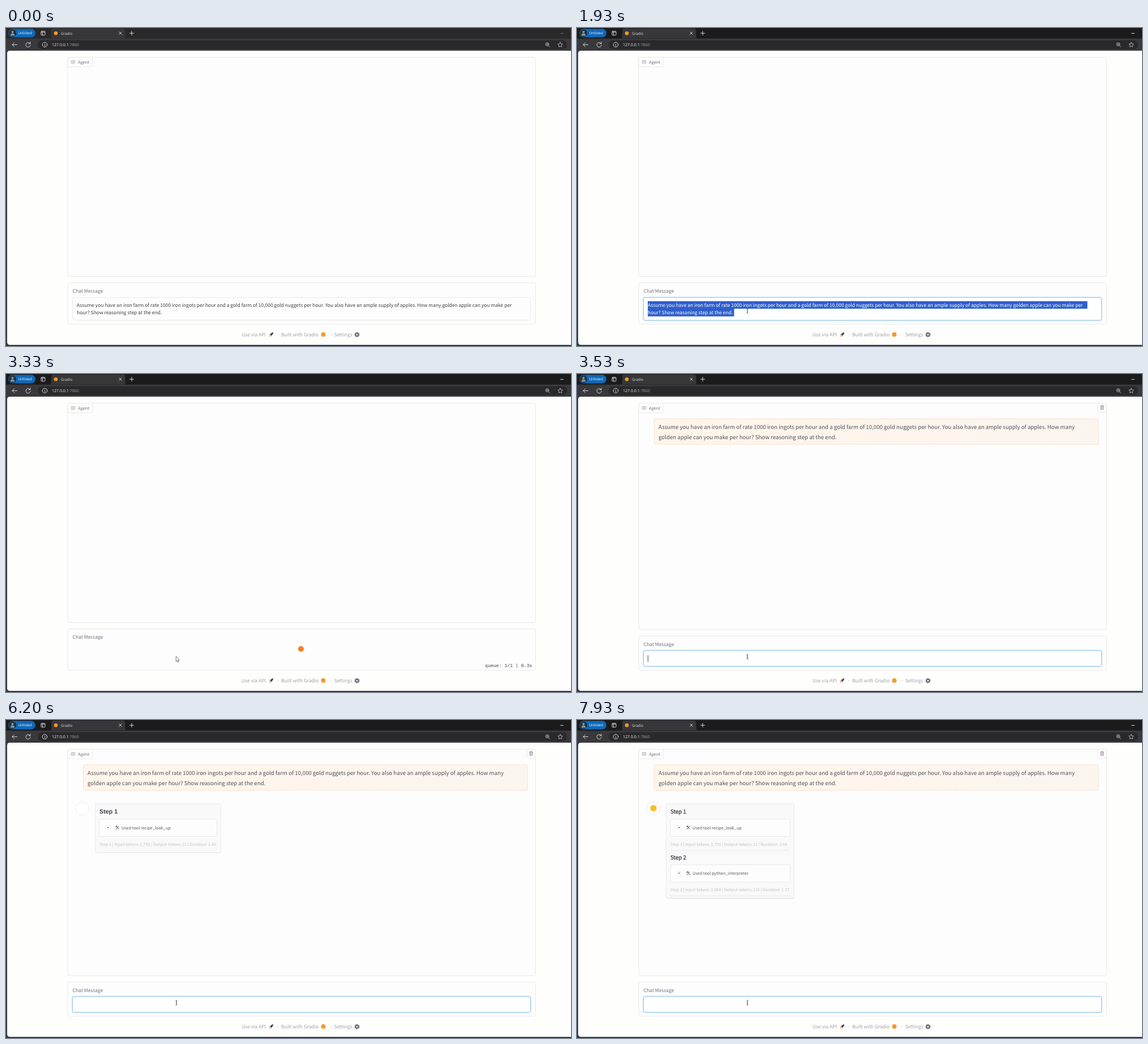
An HTML page that plays this animation: 998x561 px, repeating every 8 s.

```html
<!DOCTYPE html>
<html lang="en">
<head>
<meta charset="utf-8">
<title>Agent chat</title>
<style>
html, body { margin: 0; width: 100%; height: 100%; overflow: hidden; background: #37373a; }
svg { display: block; width: 100vw; height: 100vh; }
text {
  font-family: "Noto Sans CJK JP", "Noto Sans CJK SC", "Noto Sans CJK KR", "Open Sans", sans-serif;
  text-rendering: geometricPrecision;
  white-space: pre;
}
.ui { font-family: "Open Sans", "Noto Sans", sans-serif; }
.mono { font: 8.15px "Liberation Mono", monospace; fill: #3f3f46; }
.md { font-size: 8.47px; }
.sm { font-size: 7.28px; }
.lg { font-size: 9.68px; }
.label { fill: #71717a; }
.ink { fill: #3f3f46; }
.meta { fill: #c3c3c8; }
.foot { fill: #a1a1aa; }
.head { fill: #33333a; stroke: #33333a; stroke-width: .25; }
.plain { font: bold 10.7px "Liberation Sans", sans-serif; fill: #3f3f46; }
.box { fill: #fdfdfd; stroke: #e5e5e8; stroke-width: .8; }
.line { fill: none; stroke: #d8d8da; stroke-width: 1; stroke-linecap: round; stroke-linejoin: round; }
.focus { fill: #fff; stroke: #93c7ee; stroke-width: 1; }
.glow { fill: none; stroke: #d9ecfb; stroke-width: 2.4; }
.caret { fill: #3a3a40; }

/* every part shares one 8 s clock */
.t { animation: 8s step-end infinite; }
.active { animation-name: active; }
.pick { animation-name: pick; }
.compose { animation-name: compose; }
.before { animation-name: before; }
.queue { animation-name: queue; }
.chat { animation-name: chat; }
.click { animation-name: click; }
.blink { animation-name: blink; }
.reply { animation-name: reply; }
.raw { animation-name: raw; }
.styled { animation-name: styled; }
.face { animation-name: face; }
.one { animation-name: one; }
.two { animation-name: two; }
.beam { animation-name: beam; }
.hover { animation: hover 8s ease-in-out infinite; }
.digits { animation: digits 8s linear infinite; }

@keyframes active { 0% { opacity: 0 } 11.5%, to { opacity: 1 } }
@keyframes click { 0% { opacity: 0 } 11.5% { opacity: 1 } 18.2%, to { opacity: 0 } }
@keyframes pick { 0% { opacity: 0 } 21.5% { opacity: 1 } 37.4%, to { opacity: 0 } }
@keyframes compose { 0% { opacity: 1 } 37.4%, to { opacity: 0 } }
@keyframes before { 0% { opacity: 1 } 43.9%, to { opacity: 0 } }
@keyframes queue { 0% { opacity: 0 } 37.4% { opacity: 1 } 43.9%, to { opacity: 0 } }
@keyframes chat { 0% { opacity: 0 } 43.9%, to { opacity: 1 } }
@keyframes blink {
  0%, 45.8%, 59%, 71.5%, 84.9%, 98.2%, to { opacity: 0 }
  43.9%, 52.4%, 64.9%, 78.25%, 91.5% { opacity: 1 }
}
@keyframes reply { 0% { opacity: 0 } 77.25%, to { opacity: 1 } }
@keyframes raw { 0% { opacity: 0 } 77.25% { opacity: 1 } 78.25%, to { opacity: 0 } }
@keyframes styled { 0% { opacity: 0 } 78.25%, to { opacity: 1 } }
@keyframes face { 0% { opacity: 0 } 82.4%, to { opacity: 1 } }
@keyframes one { 0% { opacity: 0 } 77.25% { opacity: 1 } 98.2%, to { opacity: 0 } }
@keyframes two { 0% { opacity: 0 } 98.2%, to { opacity: 1 } }
@keyframes beam { 0% { opacity: 0 } 10% { opacity: 1 } 37.4% { opacity: 0 } 43.9%, to { opacity: 1 } }
@keyframes hover {
  0%, 16.2% { transform: translate(224px, 488px) }
  21.3%, to { transform: translate(301px, 498.7px) }
}
@keyframes digits {
  0%, 37.4% { transform: none; animation-timing-function: steps(6) }
  44.9%, to { transform: translateY(-72px) }
}
</style>
</head>
<body>
<svg viewBox="0 0 998 561" preserveAspectRatio="none">
  <defs>
    <linearGradient id="peach" x2="1">
      <stop offset="0" stop-color="#fff5ea"/>
      <stop offset="1" stop-color="#fbf5f0"/>
    </linearGradient>
    <clipPath id="slot"><rect x="918" y="509" width="8" height="10"/></clipPath>
    <g id="ask" class="md">
      <text x="125" y="491.5">Assume you have an iron farm of rate 1000 iron ingots per hour and a gold farm of 10,000 gold nuggets per hour. You also have an ample supply of apples. How many golden apple can you make per</text>
      <text x="125" y="505.2">hour? Show reasoning step at the end.</text>
    </g>
    <g id="tools" fill="none" stroke-linecap="round">
      <path d="M-2.6 2.6 2 -2" stroke="#77777f" stroke-width="1.1"/>
      <path d="M2.6 2.6 -1.4 -1.4" stroke="#a8705a" stroke-width="1.1"/>
      <path d="M-3 -1.2 -1.2 -3" stroke="#55555c" stroke-width="1.4"/>
    </g>
    <g id="fold">
      <circle r="4" fill="#f7f7f8" stroke="#ededf0" stroke-width=".6"/>
      <path d="M-1.7 -.7h3.4L0 1.2z" fill="#66666e"/>
    </g>
  </defs>

  <!-- browser chrome -->
  <rect width="998" height="561" fill="#38383d"/>
  <rect width="998" height="18.5" fill="#292929"/>
  <rect class="t active" width="998" height="18.5" fill="#1b1b1c"/>
  <path d="M77 18.5q3 0 3-3V4.500q0-3.500 3.500-3.500H207q3.500 0 3.500 3.500V15.500q0 3 3 3z" fill="#37373a"/>
  <rect x="4" y="1.500" width="48" height="15" rx="7.500" fill="#0f69b9"/>
  <circle cx="11.500" cy="9" r="6.600" fill="#23303c"/>
  <circle cx="11.500" cy="7" r="2.100" fill="#8b98a3"/>
  <path d="M7.700 13.600q0-4 3.800-4t3.800 4z" fill="#8b98a3"/>
  <text class="ui" x="21.500" y="11.300" font-size="6.300" fill="#fff">Unlisted</text>
  <rect class="line" x="62" y="5.800" width="7" height="7" rx="1.300"/>
  <path class="line" d="M62.500 7.200h6M64.300 8v4.500" stroke-width="1.500"/>
  <circle cx="88" cy="9.200" r="3.300" fill="#f59a2c"/>
  <text class="ui" x="97" y="11.600" font-size="6.400" fill="#e8e8e8">Gradio</text>
  <path class="line" d="M199.800 7l4.300 4.300m0-4.300-4.300 4.300M218.500 9.200h7M222 5.700v7"/>
  <path class="line" d="M979.500 9.500h5" opacity=".4"/>
  <path class="line t active" d="M979.500 9.500h5"/>
  <path class="line" d="M19.500 29.500h-8.500m3.700-3.700L11 29.500l3.700 3.700"/>
  <path class="line" d="M42.600 27.500a4.100 4.100 0 1 0 .6 2.700M43 24.800v2.900h-2.900"/>
  <rect x="55" y="21" width="937" height="17" rx="8.500" fill="#29292c" stroke="#47474b" stroke-width=".7"/>
  <circle class="line" cx="68.500" cy="29.400" r="4.200"/>
  <path class="line" d="M68.500 29.200v2.200M68.500 27.300v.1"/>
  <text class="ui" x="81" y="32" font-size="7.050" fill="#f4f4f4">127.0.0.1<tspan fill="#a0a0a4">:7860</tspan></text>
  <g opacity=".75">
    <circle class="line" cx="956" cy="28.700" r="2.900"/>
    <path class="line" d="M958.200 31l2.300 2.300M954.700 28.700h2.600M956 27.400v2.600" stroke-width=".8"/>
    <path class="line" d="M979 25.200l1.300 2.700 3 .4-2.200 2.100.5 3-2.600-1.400-2.600 1.400.5-3-2.200-2.100 3-.4z" stroke-width=".8"/>
  </g>
  <path d="M998 40H7q-5 0-5 5V554q0 5 5 5H998z" fill="#fefefd"/>

  <!-- panels before the message is sent -->
  <g class="t before">
    <rect class="box" x="109" y="51.500" width="826.500" height="387" rx="3"/>
    <rect class="box" x="109" y="449.500" width="826.500" height="73" rx="3"/>
    <text class="md label" x="117.500" y="466.500">Chat Message</text>
  </g>
  <g class="t compose">
    <rect class="box" x="117.500" y="475.500" width="809" height="40" rx="3"/>
    <g class="t active">
      <rect class="glow" x="117" y="475" width="810" height="41" rx="3.500"/>
      <rect class="focus" x="117.500" y="475.500" width="809" height="40" rx="3"/>
    </g>
    <use href="#ask" class="ink"/>
  </g>
  <rect class="caret t click" x="223.500" y="482" width=".9" height="12.500"/>
  <g class="t pick">
    <path d="M125 482H901.500V495.300H277.500V508.700H125z" fill="#2e5fcb"/>
    <use href="#ask" fill="#fff"/>
  </g>

  <!-- waiting -->
  <g class="t queue">
    <circle cx="521" cy="485" r="5" fill="#f0802b"/>
    <text class="mono" x="846.300" y="516.600">queue: 1/1 | 0.</text>
    <g clip-path="url(#slot)">
      <text class="mono digits"><tspan x="919.700" y="516.600">0</tspan><tspan x="919.700" dy="12">1</tspan><tspan x="919.700" dy="12">2</tspan><tspan x="919.700" dy="12">3</tspan><tspan x="919.700" dy="12">4</tspan><tspan x="919.700" dy="12">5</tspan></text>
    </g>
    <text class="mono" x="924.600" y="516.600">s</text>
    <path d="M300.300 498v9.200l2.100-1.900 1.400 3 1.300-.6-1.400-2.900h2.800z" fill="#fff" stroke="#44444a" stroke-width=".7"/>
  </g>

  <!-- conversation -->
  <g class="t chat">
    <rect class="box" x="109" y="51.500" width="826.500" height="399.500" rx="3"/>
    <rect class="box" x="109" y="462" width="826.500" height="60.500" rx="3"/>
    <text class="md label" x="117.500" y="479.500">Chat Message</text>
    <rect class="glow" x="117" y="487.500" width="810" height="28.500" rx="3.500"/>
    <rect class="focus" x="117.500" y="488" width="809" height="27.500" rx="3"/>
    <path class="box" d="M920 51.500h12.500q3 0 3 3V67.500H923q-3 0-3-3z"/>
    <path d="M924.200 57h6.600M926.200 57v-1.500h2.600V57M925 57l.4 5.800h4.200l.4-5.800M926.800 58.500v2.800M928.200 58.500v2.800" fill="none" stroke="#7a7a82" stroke-width=".75"/>
    <path d="M139.500 79H918q3 0 3 3V124H139.500q-3 0-3-3V82q0-3 3-3z" fill="url(#peach)" stroke="#fbd9bf" stroke-width=".8"/>
    <g class="lg" fill="#52525b">
      <text x="144" y="97.200">Assume you have an iron farm of rate 1000 iron ingots per hour and a gold farm of 10,000 gold nuggets per hour. You also have an ample supply of apples. How many</text>
      <text x="144" y="115.200">golden apple can you make per hour? Show reasoning step at the end.</text>
    </g>
  </g>
  <rect class="caret t blink" x="124.900" y="496" width=".9" height="12"/>

  <!-- agent reply -->
  <g class="t reply">
    <circle cx="135" cy="156" r="11.700" fill="#fff" stroke="#e6e6ea" stroke-width=".8"/>
    <circle class="t face" cx="135" cy="155.500" r="5.600" fill="#f5bd2b"/>
  </g>
  <g class="t one">
    <rect x="157.500" y="148" width="222" height="87" rx="3" fill="#ececef"/>
    <rect x="157.500" y="147.500" width="222" height="86.500" rx="3" fill="#f9f9fa" stroke="#e7e7eb" stroke-width=".8"/>
    <rect class="box" x="165" y="175" width="207.500" height="30.500" rx="2"/>
    <path d="M165 229.800h207.500" stroke="#ededf0" stroke-width=".7"/>
  </g>
  <g class="t two">
    <rect x="157.500" y="148.200" width="226" height="167" rx="3" fill="#e2e2e6"/>
    <rect x="157.500" y="147.500" width="226" height="166.500" rx="3" fill="#f9f9fa" stroke="#e7e7eb" stroke-width=".8"/>
    <rect class="box" x="165" y="175" width="211.500" height="30.500" rx="2"/>
    <rect class="box" x="165" y="255.500" width="211.500" height="30.500" rx="2"/>
    <path d="M165 229.800h211.500M165 310.200h211.500" stroke="#e3e3e7" stroke-width=".8"/>
    <text class="lg head" x="165" y="245.900">Step 2</text>
    <use href="#fold" x="180.500" y="270.200"/>
    <use href="#tools" x="197" y="270.200"/>
    <text class="sm" x="204" y="273" fill="#5b5b64">Used tool python_interpreter</text>
    <text class="sm meta" x="165" y="302.300">Step 2 | Input-tokens:2,088 | Output-tokens:135 | Duration: 1.77</text>
  </g>
  <g class="t reply">
    <use href="#fold" x="180.500" y="189.700"/>
    <use href="#tools" x="197" y="189.700"/>
    <text class="sm" x="204" y="192.500" fill="#5b5b64">Used tool recipe_look_up</text>
    <text class="sm meta" x="165" y="221.800">Step 1 | Input-tokens:1,795 | Output-tokens:11 | Duration: 2.66</text>
  </g>
  <text class="plain t raw" x="165" y="165.200">Step 1</text>
  <text class="lg head t styled" x="165" y="165.400">Step 1</text>

  <!-- panel tag -->
  <path class="box" d="M109 68.500V54.500q0-3 3-3H153V65.500q0 3-3 3z"/>
  <path d="M115.300 57.500h6.400v4.700h-2.200l-1.200 1.200-1-1.200h-2zM117 59.200h3M117 60.600h3" fill="none" stroke="#8e8e96" stroke-width=".65"/>
  <text class="sm label" x="127.300" y="63.200">Agent</text>

  <!-- footer -->
  <g class="md foot">
    <text x="416" y="544.200">Use via API</text>
    <text x="478" y="544.200">·</text>
    <text x="486" y="544.200">Built with Gradio</text>
    <text x="571.700" y="544.200">·</text>
    <text x="579.700" y="544.200">Settings</text>
  </g>
  <path d="M472.200 537q-3.800.2-5.800 3.800l2 2q3.600-2 3.800-5.800z" fill="#3f4350"/>
  <path d="M466.800 539.400l-2.300 1.200 1.800.6zM469.800 542.400l-1.200 2.300-.6-1.800zM466.200 541.700l1.300 1.300-3 2z" fill="#f0702c"/>
  <circle cx="560.500" cy="540.700" r="4" fill="#f59a2c"/>
  <circle cx="620" cy="541" r="2.500" fill="none" stroke="#5d6470" stroke-width="2"/>
  <circle cx="620" cy="541" r="4" fill="none" stroke="#5d6470" stroke-width="1.200" stroke-dasharray="1.571"/>

  <!-- text pointer -->
  <g class="t beam">
    <path class="hover" d="M-1.500-4h1.200q.3 0 .3.400V3.600q0 .4-.3.400h-1.200M1.500-4H.3Q0-4 0-3.600V3.600Q0 4 .3 4h1.200" fill="none" stroke="#55555c" stroke-width=".8"/>
  </g>
</svg>
</body>
</html>
```
